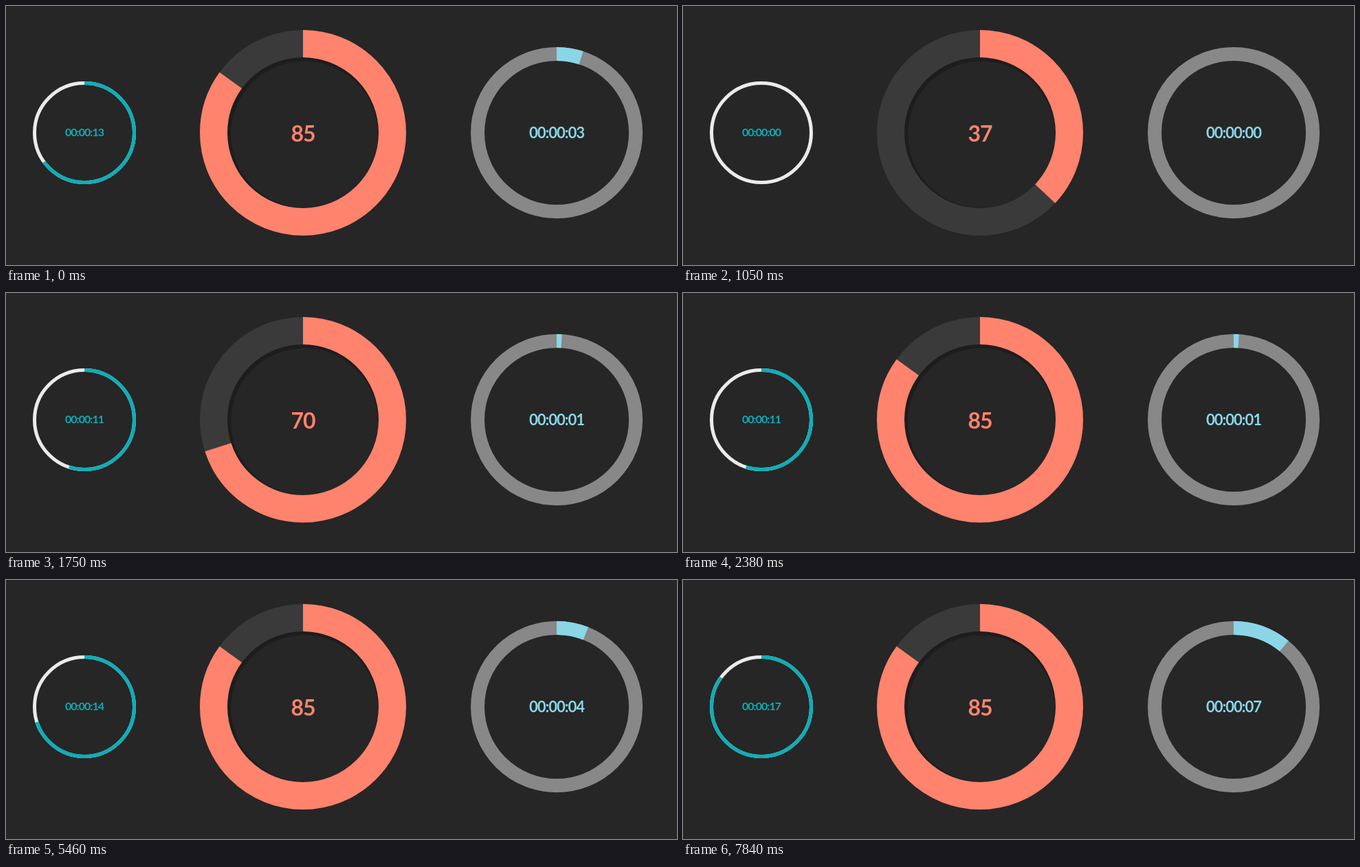
These frames come from a looping animation (976x378 px, 7.91 s). An HTML page:

```html
<!DOCTYPE html>
<html lang="en">
<head>
<meta charset="utf-8">
<title>Ring timers</title>
<style>
  html, body { margin: 0; width: 100%; height: 100%; overflow: hidden; background: #262626; }
  svg { display: block; width: 976px; height: 378px; }
  text { font-family: Lato, sans-serif; font-weight: 700; letter-spacing: -1px; text-anchor: middle; }
</style>
</head>
<body>
<svg id="stage" viewBox="0 0 976 378">
  <rect width="976" height="378" fill="#262626"/>
  <circle cx="432" cy="185" r="111" fill="#1d1d1d"/>
  <circle cx="434" cy="187.5" r="107" fill="#262626"/>
</svg>
<script>
const LOOP = 7910, STEP = 70;
const RESTART = 260;     // all three timers start again
const COUNT_MS = 21.1;   // one percent of the middle ring
const FIRST_TICK = 1475; // first second shown by the clocks
const stage = document.getElementById('stage');

function add(tag, attrs) {
  const el = document.createElementNS('http://www.w3.org/2000/svg', tag);
  for (const key in attrs) el.setAttribute(key, attrs[key]);
  return stage.appendChild(el);
}

function makeRing(x, radius, width, track, color, size, baseline) {
  const base = { cx: x, cy: 185, r: radius - width / 2, fill: 'none', 'stroke-width': width };
  add('circle', { ...base, stroke: track });
  const arc = add('circle', {
    ...base, stroke: color, pathLength: 100, transform: `rotate(-90 ${x} 185)`
  });
  const label = add('text', { x, y: baseline, fill: color, 'font-size': size });
  return (percent, text) => {
    arc.setAttribute('stroke-dasharray', `${percent} 100`);
    arc.setAttribute('visibility', percent > 0 ? 'visible' : 'hidden');
    label.textContent = text;
  };
}

const left = makeRing(114, 75, 5, '#ebebe9', '#0caeb8', 16, 190);
const middle = makeRing(432, 150, 40, '#3a3a3a', '#ff836d', 32, 197.5);
const right = makeRing(801, 125, 20, '#888888', '#8ad6e7', 22, 193);

const clock = s => '00:00:' + String(s).padStart(2, '0');

function draw(time) {
  const t = Math.floor((time % LOOP) / STEP) * STEP;
  let count = 85, secs = 3;
  if (t >= RESTART) {
    count = Math.min(85, Math.floor((t - RESTART) / COUNT_MS));
    secs = Math.max(0, Math.floor((t - FIRST_TICK) / 1000) + 1);
  }
  const leftSecs = secs ? secs + 10 : 0;
  left(leftSecs * 5, clock(leftSecs));
  middle(count, String(count));
  right(Math.floor(secs * 100 / 60), clock(secs));
}

const start = performance.now();
function tick() {
  draw(performance.now() - start);
  requestAnimationFrame(tick);
}
tick();
</script>
</body>
</html>
```
